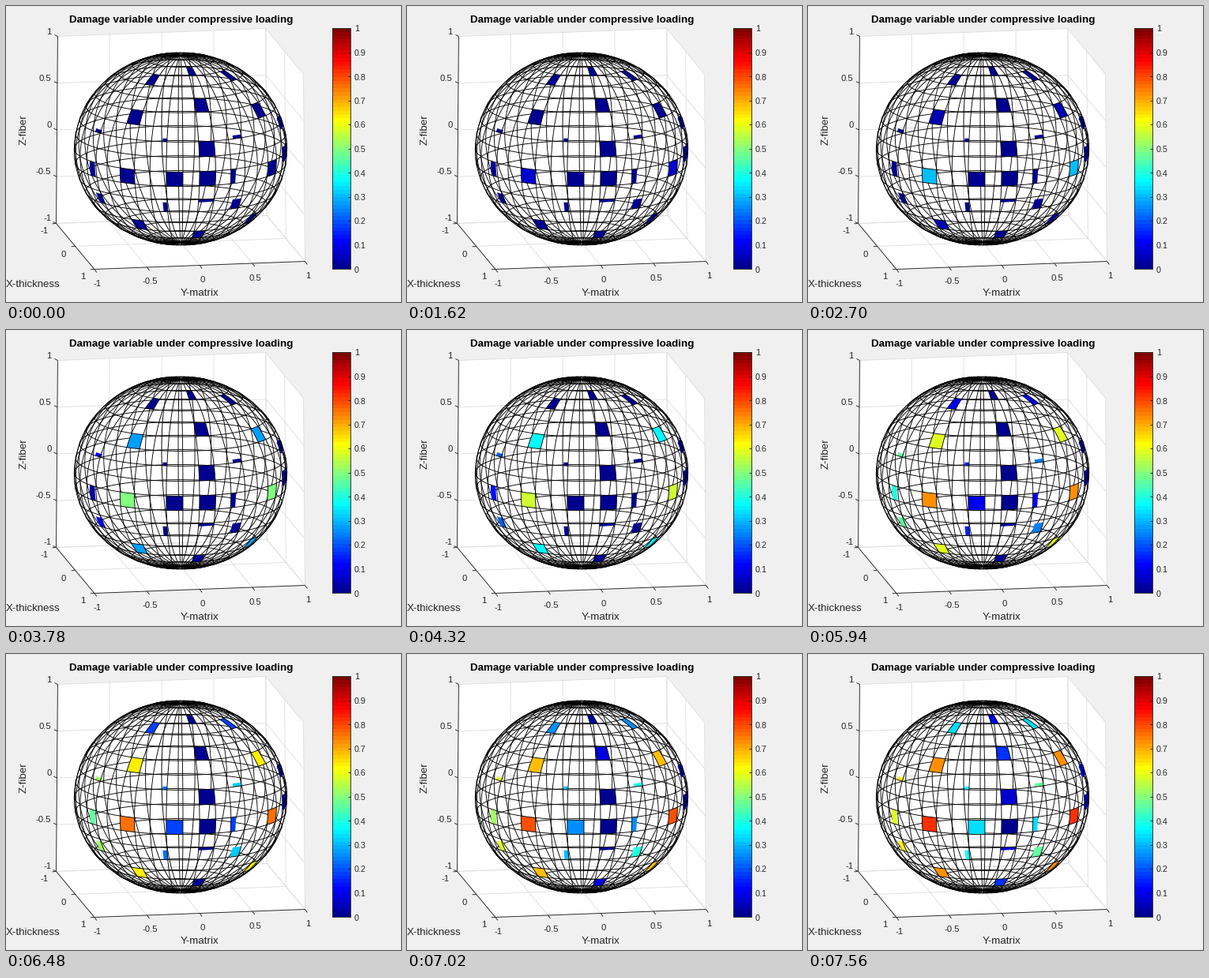
These frames come from a looping animation (500 px wide and 375 px high, 8 s). A matplotlib script:

```python
import numpy as np
import matplotlib.pyplot as plt
from matplotlib.animation import FuncAnimation
from matplotlib.collections import LineCollection, PolyCollection

W, H, DPI = 500, 375, 100
PX = 72 / DPI            # points per pixel
LOOP, STEP, HOLD, LAST = 8000, 40, 540, 14
CELL = 9                 # mesh spacing in degrees
DARK = "#262626"

plt.rcParams["font.family"] = "Liberation Sans"
fig = plt.figure(figsize=(W / DPI, H / DPI), dpi=DPI, facecolor="#f0f0f0")
ax = fig.add_axes([0, 0, 1, 1])
ax.axis("off")


def project(x, y, z):
    """Map box coordinates in [-1, 1] to stage pixels."""
    px = 221 + (24 * x + 132.5 * y) * (1 - 0.006 * z)
    py = 181 + 29 * x - 5 * y - 118.5 * z
    return np.stack(np.broadcast_arrays(px, py), axis=-1)


def sphere(lon, lat):
    lon, lat = np.radians(lon), np.radians(lat)
    return np.cos(lat) * np.cos(lon), np.cos(lat) * np.sin(lon), np.sin(lat)


def lines(segs, color, width, z):
    ax.add_collection(LineCollection(segs, colors=color, linewidths=width * PX, zorder=z))


def text(x, y, s, size=11.4, **kw):
    opts = dict(ha="center", va="center_baseline", color=DARK) | kw
    ax.text(x, y, s, fontsize=size * PX, **opts)


def jet(v):
    """Jet map with 64 levels."""
    t = (np.floor(np.clip(v, 0, 0.999) * 64) + 1) / 64
    return np.stack([np.clip(1.5 - np.abs(4 * t - c), 0, 1) for c in (3, 2, 1)], axis=-1)


def seg(a, b):
    return [project(*a), project(*b)]


def draw_box():
    hull = [(-1, -1, 1), (-1, 1, 1), (1, 1, 1), (1, 1, -1), (1, -1, -1), (-1, -1, -1)]
    ax.fill(*np.array([project(*p) for p in hull]).T, color="white", lw=0, zorder=0)

    halves, units = np.linspace(-1, 1, 5), (-1, 0, 1)
    grid = []
    for v in halves:
        grid += [seg((-1, v, -1), (-1, v, 1)), seg((-1, v, -1), (1, v, -1)),
                 seg((-1, -1, v), (-1, 1, v)), seg((-1, 1, v), (1, 1, v))]
    for v in units:
        grid += [seg((v, 1, -1), (v, 1, 1)), seg((v, -1, -1), (v, 1, -1))]
    lines(grid, "#dfdfdf", 0.9, 1)

    axes = [seg((-1, -1, -1), (-1, -1, 1)), seg((-1, -1, -1), (1, -1, -1)),
            seg((1, -1, -1), (1, 1, -1))]
    for v in halves:
        p, q = project(-1, -1, v), project(1, v, -1)
        axes += [[p, p + (-4, -2)], [q, q + (3, 4)]]
        text(57.5, p[1] - 7, f"{v:g}", ha="right")
        text(q[0] + 4, q[1] + 17.5, f"{v:g}")
    for v in units:
        p = project(v, -1, -1)
        axes.append([p, p + (-5, 0.3)])
        text(p[0] - 15, p[1] + 9, f"{v:g}")
    lines(axes, DARK, 0.9, 2)

    text(221.5, 17, "Damage variable under compressive loading", 13.45,
         weight="bold", color="black")
    text(68, 351, "X-thickness", 13.3, ha="right")
    text(245, 362.5, "Y-matrix", 13.4)
    text(23, 157, "Z-fiber", 13.4, rotation=90, va="center")


def draw_colorbar():
    x0, x1, top, bottom = 413, 436, 28, 333
    ramp = jet((np.arange(64) + 0.5) / 64)[::-1, None]
    ax.imshow(ramp, extent=(x0, x1, bottom, top), aspect="auto",
              interpolation="nearest", zorder=3)
    edge = [[(x0, top), (x1, top), (x1, bottom), (x0, bottom), (x0, top)]]
    for i in range(11):
        y = bottom + (top - bottom) * i / 10
        edge.append([(x1 - 3, y), (x1, y)])
        text(441, y + 0.5, f"{i / 10:g}", 10.7, ha="left")
    lines(edge, DARK, 0.9, 4)


def draw_mesh():
    """Far half of the wireframe below the cells, near half above them."""
    arc, turn = np.linspace(-90, 90, 91), np.linspace(0, 360, 181)
    curves = [sphere(lon, arc) for lon in range(0, 360, CELL)]
    curves += [sphere(turn, lat) for lat in range(-81, 90, CELL)]
    near, far = [], []
    for x, y, z in curves:
        depth = (x - 0.18 * y + 0.25 * z)[:, None]
        path = project(x, y, z)
        near.append(np.where(depth > -0.03, path, np.nan))
        far.append(np.where(depth < 0.03, path, np.nan))
    lines(far, "black", 0.9, 4)
    lines(near, "black", 0.9, 6)


def patch(lon, lat, width, height):
    s = np.linspace(0, 1, 5)
    u = np.concatenate([s, s * 0 + 1, s[::-1], s * 0])
    v = np.roll(u, 5)
    return project(*sphere(lon + width * u, lat - height * v))


def onset(lon, lat):
    """Step at which damage starts: first on diagonal planes near the equator."""
    lon, lat = np.radians(lon), np.radians(lat)
    return (2.55 + 11.3 * np.cos(2 * lon) ** 2 * np.cos(lat) ** 2
            + 10.5 * np.abs(np.sin(lat)) ** 3)


# Cells hang below a latitude and run sideways from a longitude.
diagonal = [(lon, lat, CELL, CELL) for lat in (63, 36, 0, -36) for lon in (-45, 45)]
middle = [(0, lat, CELL, CELL) for lat in (72, 45, 18, 0, -45)]
slivers = [(lon, lat, w, h) for lat, h in ((20, 2), (-20, 7))
           for lon, w in ((-62, -6), (-18, -2.5), (21, 6))]
equator = [(-18, 0, CELL, CELL), (-64, 0, -5, CELL), (18, 0, 3, CELL), (0, -18, CELL, 2)]
rim = [(85, 22, -18, 7), (85, 5, -22, CELL)]
parts = diagonal + middle + slivers + equator + rim

start = np.array([onset(*p[:2]) for p in parts])
rate = 0.17 - 0.007 * start
cells = PolyCollection([patch(*p) for p in parts], linewidths=0, zorder=5)

draw_box()
draw_colorbar()
draw_mesh()
ax.add_collection(cells)
ax.set_xlim(0, W)
ax.set_ylim(H, 0)


def update(i):
    k = min(int((i + 0.5) * STEP // HOLD), LAST)
    damage = 1 - np.exp(-rate * np.maximum(k - start, 0))
    cells.set_facecolor(jet(damage))
    return [cells]


anim = FuncAnimation(fig, update, frames=LOOP // STEP, interval=STEP,
                     repeat=True, repeat_delay=0, blit=False)
plt.show()
```
